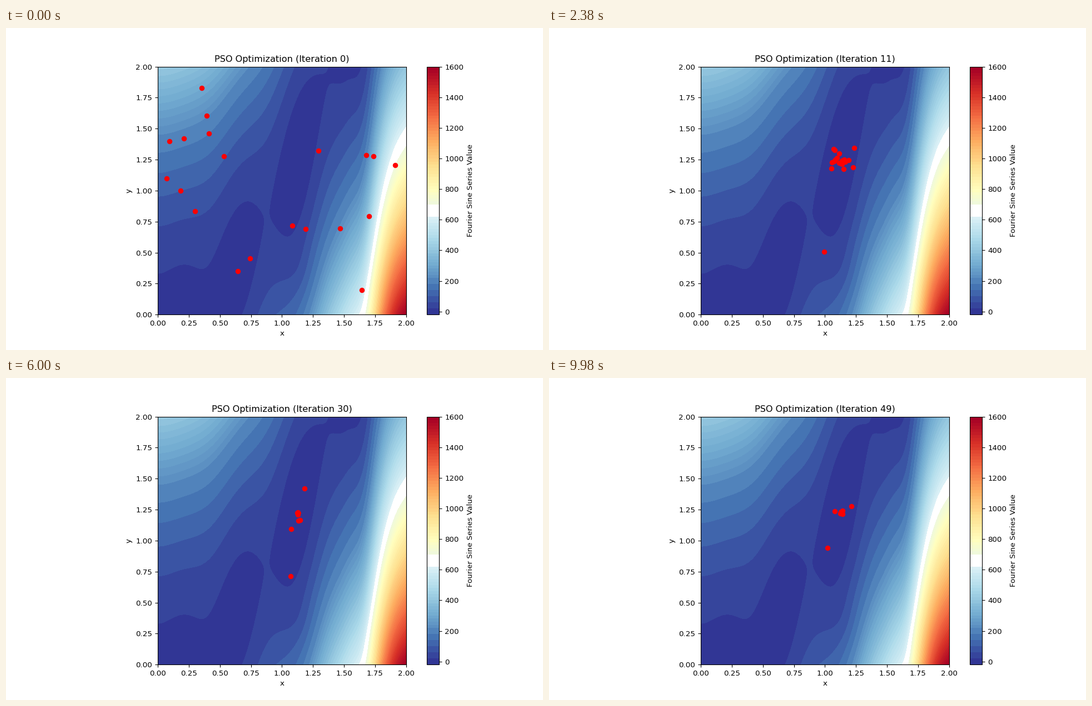
Animation of 966x580 px, one loop 10000 ms. Source, as a matplotlib script:

```python
import numpy as np
import matplotlib.pyplot as plt
from matplotlib.animation import FuncAnimation

W, H, DPI = 966, 580, 100
ITERATIONS, STEPS = 50, 10      # STEPS frames per swarm iteration
BEST = np.array([1.128, 1.224])

# Where the particles start, in plot units
START_X = [0.353, 0.394, 0.412, 0.094, 0.21, 0.533, 0.071, 0.183, 0.3, 0.645,
           0.743, 1.083, 1.191, 1.469, 1.701, 1.643, 1.294, 1.679, 1.737, 1.912]
START_Y = [1.828, 1.604, 1.461, 1.398, 1.42, 1.277, 1.098, 1.0, 0.834, 0.35,
           0.453, 0.717, 0.69, 0.695, 0.794, 0.198, 1.322, 1.286, 1.277, 1.206]

plt.rcParams["font.size"] = 9.66


def bump(v, mid, width):
    return np.exp(-((v - mid) / width) ** 2)


def field(x, y):
    """Banana valley with a ripple in x that grows towards the right edge."""
    base = 100 * (y - x**2) ** 2 + (1 - x) ** 2 + 8 * (1 - (x / 2) ** 4)
    t = np.clip((x - 1.5) / 0.35, 0, 1)
    amp = (15 * x + 100 * t * t * (3 - 2 * t)) * (1.2 - 0.3 * y)
    ripple = -amp * np.sin(4 * np.pi * (x + 0.03 * bump(x, 1.75, 0.12)))
    dips = (-30 * bump(x, 1.72, 0.12) * bump(y, 0, 0.17)
            - 10 * bump(x, 1.15, 0.1) * bump(y, 0.35, 0.2))
    return np.clip(base + ripple + dips, -19, 1599)


def draw_plot(fig):
    ax = fig.add_subplot()
    x, y = np.meshgrid(np.linspace(0, 2, 301), np.linspace(0, 2, 301))
    levels = np.arange(-20, 1601, 20)
    colors = plt.get_cmap("RdYlBu_r")(np.linspace(0, 1, len(levels) - 1))
    colors[1:13:2] = colors[0:12:2]     # darkest bands share colours in pairs
    colors[32:36] = 1                   # white belt from 620 to 700
    filled = ax.contourf(x, y, field(x, y), levels=levels, colors=colors)
    fig.colorbar(filled, ax=ax, ticks=np.arange(0, 1601, 200),
                 label="Fourier Sine Series Value")
    ax.set(xlim=(0, 2), ylim=(0, 2), xlabel="x", ylabel="y", aspect="equal")
    return ax


def run_swarm():
    """Particle positions at every iteration, one more than is titled."""
    rng = np.random.default_rng(4)
    pos = np.column_stack([START_X, START_Y])
    vel = np.zeros_like(pos)
    history = [pos]
    for i in range(ITERATIONS):
        # The common goal slides up the valley to the optimum
        goal = BEST + (np.array([0.74, 0.45]) - BEST) * np.exp(-i / 3)
        vel = 0.6 * vel + rng.uniform(0, 1.4, pos.shape) * (goal - pos)
        if i > 3 and i % 7 in (0, 3):   # one particle strays down and left
            stray = rng.integers(len(pos))
            vel[stray] += rng.uniform((-0.45, -0.6), (0, -0.2))
        pos = pos + vel
        history.append(pos)
    return history


fig = plt.figure(figsize=(W / DPI, H / DPI), dpi=DPI)
plot = draw_plot(fig)

# Keep the finished plot as a backdrop so each frame only draws the swarm
fig.canvas.draw()
backdrop = np.array(fig.canvas.buffer_rgba())
box = plot.get_position()
fig.clf()
fig.figimage(backdrop, zorder=-1)

ax = fig.add_axes(box)
ax.set(xlim=(0, 2), ylim=(0, 2))
ax.axis("off")
history = run_swarm()
dots = ax.scatter(START_X, START_Y, s=33.6, color="red")
title = ax.set_title("")


def update(frame):
    i, step = divmod(frame, STEPS)
    u = step / STEPS
    dots.set_offsets(history[i] * (1 - u) + history[i + 1] * u)
    title.set_text(f"PSO Optimization (Iteration {i})")
    return dots, title


anim = FuncAnimation(fig, update, frames=ITERATIONS * STEPS, interval=20,
                     repeat=True, cache_frame_data=False)
plt.show()
```
